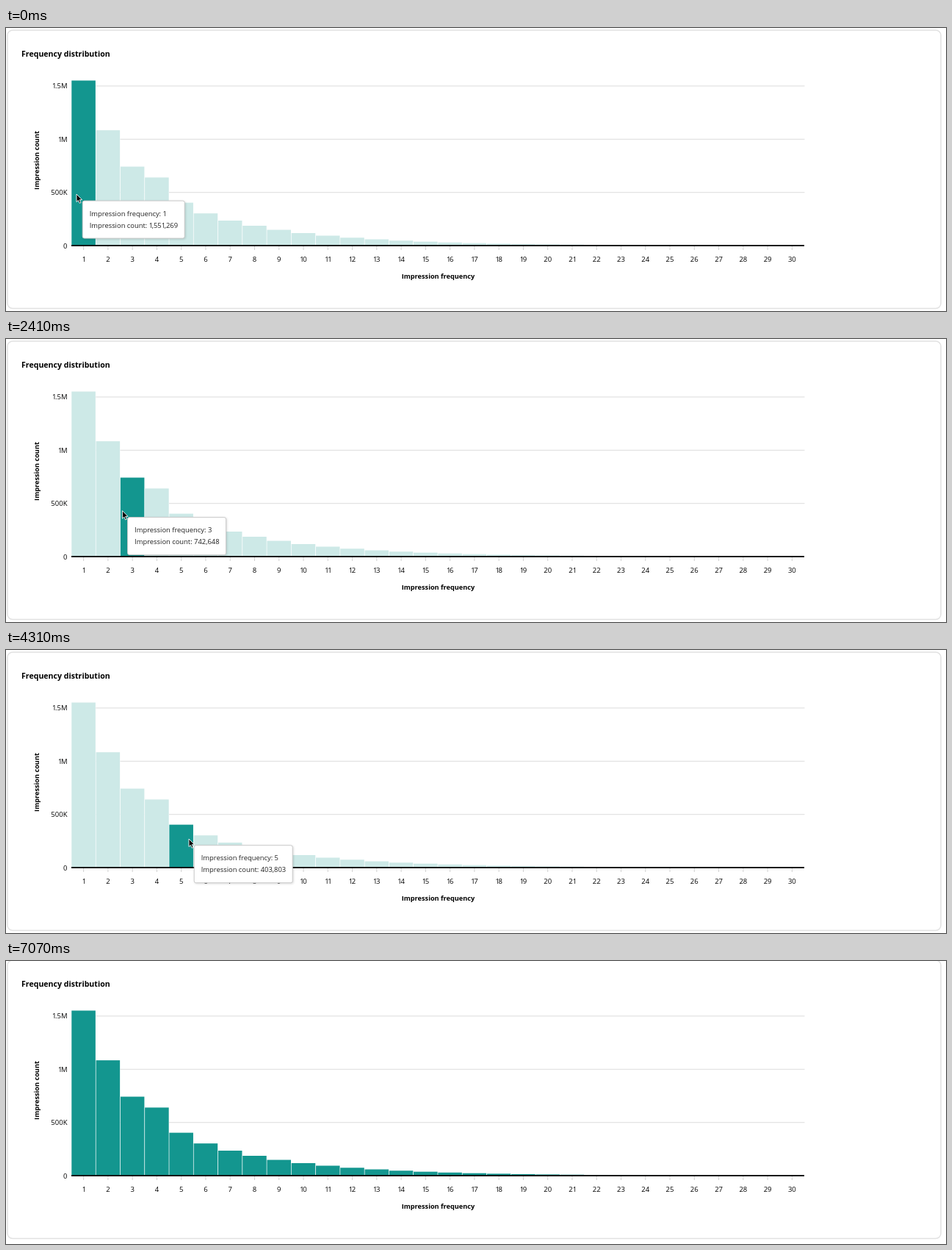
Recreate the animation shown at these times as an HTML page. Size 1280 px wide and 385 px high, loop 8630 ms.

```html
<!DOCTYPE html>
<html lang="en">
<head>
<meta charset="utf-8">
<title>Frequency distribution</title>
<style>
  html, body { margin: 0; width: 100%; height: 100%; overflow: hidden; background: #fff; }
  body { position: relative; font-family: "Open Sans", "Noto Sans", sans-serif; }
  svg { position: absolute; left: 0; top: 0; display: block; overflow: visible; }
  text { font-size: 9.5px; font-weight: 500; fill: #000; }
  .title { font-size: 10.6px; font-weight: 700; }
  .axis { font-size: 9.2px; font-weight: 700; }
  .one { letter-spacing: -.15em; }
  .grid { stroke: #e3e3e3; stroke-width: 1.2; }
  .tick { stroke: #d0d0d0; stroke-width: 1; }
  #tip {
    position: absolute; left: 0; top: 0; box-sizing: border-box; height: 52px;
    padding: 8.9px 9px; border: 1px solid #c9c9c9; border-radius: 3px;
    background: #fff; box-shadow: 1px 1px 3px rgba(0, 0, 0, .14);
    font-size: 9.4px; font-weight: 500; line-height: 16.3px; color: #222; white-space: nowrap;
  }
</style>
</head>
<body>
<svg id="chart" width="1280" height="385" viewBox="0 0 1280 385"></svg>
<div id="tip"></div>
<svg id="cursor" width="10" height="15">
  <path d="M0 0V10.6L2.4 8.4L4.1 12.3L6 11.5L4.3 7.7H7.6Z" fill="#000" stroke="#fff" stroke-width=".9" stroke-linejoin="round"/>
</svg>
<script>
const LOOP = 8630, LAG = 30;
const LEFT = 89, RIGHT = 1087, BASE = 296.1, COUNT = 30;
const BAND = (RIGHT - LEFT) / COUNT;
const UNIT = 144.8 / 1e6;
const FULL = '#13968f', PALE = '#cde9e7';
const LEAVE = 6830, SCROLL_END = 7070;

// the bars that get a tooltip; the tail decays geometrically
const counts = [1551269, 1084215, 742648, 640377, 403803, 303149, 235412];
while (counts.length < COUNT) counts.push(counts[counts.length - 1] * .795);

// pointer moves, resting in between
const origin = { x: 96, y: 226 };
const moves = [
  { from: 30, to: 860, x: 102, y: 228 },
  { from: 900, to: 1450, x: 133, y: 231, power: 4 },
  { from: 1930, to: 2590, x: 162, y: 234 },
  { from: 2930, to: 3520, x: 205, y: 240.5 },
  { from: 4000, to: 4310, x: 249, y: 257 },
  { from: 5000, to: 5340, x: 277, y: 271 },
  { from: 5930, to: 6240, x: 293, y: 276 },
  { from: 6520, to: 6590, x: 300, y: 276 }
];

const $ = id => document.getElementById(id);
const chart = $('chart'), tip = $('tip'), cursor = $('cursor');
const progress = (t, from, to) => Math.max(0, Math.min(1, (t - from) / (to - from)));
const easeOut = (k, power = 1.6) => 1 - (1 - k) ** power;
const ones = (s, tag) => String(s).replace(/1/g, `<${tag} class="one">1</${tag}>`);

function label(x, y, s, anchor, cls = '', extra = '') {
  return `<text x="${x}" y="${y}" text-anchor="${anchor}" class="${cls}" ${extra}>${ones(s, 'tspan')}</text>`;
}

function line(x1, y1, x2, y2, cls) {
  return `<line x1="${x1}" y1="${y1}" x2="${x2}" y2="${y2}" class="${cls}"/>`;
}

function build() {
  let out = '<rect x="2" y="3" width="1271" height="378.5" rx="7" fill="#fff" stroke="#e1e1e1" stroke-width="1.5"/>';
  out += label(21, 39, 'Frequency distribution', 'start', 'title');
  ['0', '500K', '1M', '1.5M'].forEach((s, i) => {
    const y = BASE - i * 5e5 * UNIT;
    if (i) out += line(LEFT, y, RIGHT + .5, y, 'grid');
    out += label(83.5, y + 3.5, s, 'end');
  });
  counts.forEach((n, i) => {
    const x = LEFT + i * BAND, mid = x + BAND / 2, h = n * UNIT;
    out += `<rect x="${x}" y="${BASE - h}" width="${BAND}" height="${h}" fill="#fff"/>`;
    out += `<rect class="bar" x="${x + .3}" y="${BASE - h}" width="${BAND - .7}" height="${h}"/>`;
    out += line(mid, BASE, mid, 302, 'tick') + label(mid, 317.7, i + 1, 'middle');
  });
  out += `<rect x="${LEFT}" y="295.1" width="${RIGHT - LEFT}" height="1.8" fill="#000"/>`;
  out += label(588.5, 340.7, 'Impression frequency', 'middle', 'axis');
  out += label(0, 0, 'Impression count', 'middle', 'axis', 'transform="translate(45.2 180) rotate(-90)"');
  chart.innerHTML = out;
}

function pointer(t) {
  let { x, y } = origin;
  for (const m of moves) {
    const k = easeOut(progress(t, m.from, m.to), m.power);
    x += (m.x - x) * k;
    y += (m.y - y) * k;
  }
  return [x, y];
}

const barAt = t => Math.floor((pointer(t)[0] - LEFT) / BAND);

// crossing into one of the first bars clears the highlight for a moment
function hovered(t) {
  if (t >= LEAVE) return -1;
  const now = barAt(t);
  return now < 4 && now !== barAt(t - LAG) ? -1 : now;
}

build();
const bars = [...chart.querySelectorAll('.bar')];
let shown = null;

function highlight(n) {
  if (n === shown) return;
  shown = n;
  bars.forEach((b, i) => b.setAttribute('fill', n < 0 || i === n ? FULL : PALE));
  tip.style.visibility = n < 0 ? 'hidden' : 'visible';
  if (n >= 0) {
    tip.innerHTML = `Impression frequency: ${ones(n + 1, 'span')}<br>` +
      `Impression count: ${ones(counts[n].toLocaleString('en-US'), 'span')}`;
  }
}

const place = (el, x, y) => { el.style.transform = `translate(${x}px, ${y}px)`; };

function draw(t) {
  highlight(hovered(t));
  const [x, y] = pointer(t), [tx, ty] = pointer(t - LAG);
  place(cursor, x, y);
  place(tip, tx + 7.7, ty + 8.6);
  cursor.style.visibility = t < LEAVE ? 'visible' : 'hidden';
  place(chart, 0, -4 * easeOut(progress(t, LEAVE, SCROLL_END)));
}

const start = performance.now();
function frame() {
  draw((performance.now() - start) % LOOP);
  requestAnimationFrame(frame);
}
frame();
</script>
</body>
</html>
```
